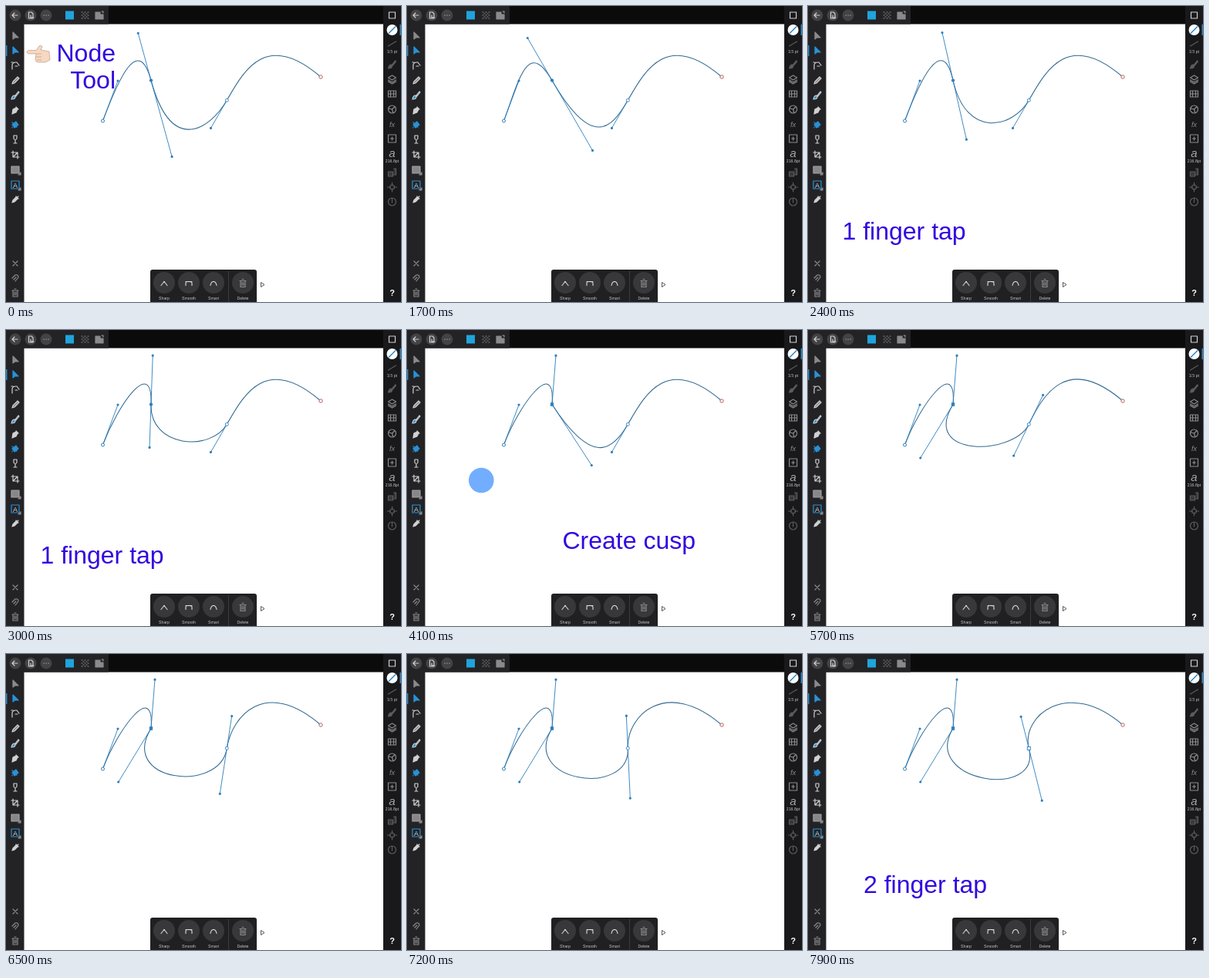
These frames come from a looping animation (512 by 384 pixels, 8000 ms). An HTML page:

```html
<!DOCTYPE html>
<html lang="en">
<head>
<meta charset="utf-8">
<style>
  html, body { margin: 0; height: 100%; overflow: hidden; background: #fff; }
  svg { display: block; width: 512px; height: 384px; }
  text { font-family: "Liberation Sans", Arial, sans-serif; }
  .caption { font-size: 32px; fill: #3208df; }
  .tiny { font-size: 5.2px; fill: #c4c4c6; text-anchor: middle; }
  .icon { fill: none; stroke-width: 1.2; stroke-linejoin: round; stroke-linecap: round; }
</style>
</head>
<body>
<svg viewBox="0 0 512 384">
  <rect width="512" height="384" fill="#fff"/>
  <g id="drawing" fill="none" stroke="#2b7ebd">
    <path id="curve" stroke="#326a91" stroke-width="1.05"/>
    <path id="arms" stroke-width=".9"/>
    <path id="dots" stroke-width="3.2" stroke-linecap="round"/>
    <circle cx="125.5" cy="149" r="2" fill="#fff"/>
    <circle cx="408" cy="92" r="2.2" fill="#fff" stroke="#b5625f"/>
    <rect id="nodeB" x="186.2" y="94.7" width="3.6" height="3.6" fill="#2b7ebd" stroke-width=".8"/>
    <rect id="nodeC" x="284.3" y="120.3" width="4" height="4" fill="#fff" stroke-width=".9"/>
  </g>
  <circle id="touch" r="16.3" fill="#72adff"/>

  <g id="intro">
    <g fill="#f6d8c3" stroke="#b98f78" stroke-width=".6" stroke-linejoin="round">
      <path d="M29 57.5H39L43 52q3-2 4 1l-2 4 11 2 1 11-6 3H42q-4 0-4-4l1-7H29q-4-2 0-4.500z"/>
      <path fill="none" d="M39 62h7M39 66h7M40 70h6"/>
    </g>
    <g class="caption" text-anchor="end"><text x="142" y="72">Node</text><text x="142" y="107">Tool</text></g>
  </g>
  <text class="caption" id="tapOne" x="44.500" y="303">1 finger tap</text>
  <text class="caption" id="cusp" x="201.500" y="284">Create cusp</text>
  <text class="caption" id="tapTwo" x="72" y="310">2 finger tap</text>

  <path fill="#0b0b0c" d="M0 0H512V23.500H0z"/>
  <path fill="#232326" d="M0 0H133V23.500H23.500V384H0z"/>
  <path fill="#19191b" d="M489 0H512V384H489z"/>
  <path fill="#2788c9" d="M0 51h1.500v14H0zM510.500 24h1.500v14h-1.500z"/>
  <g fill="#434346"><circle cx="12" cy="12" r="7.500"/><circle cx="32" cy="12" r="7.500"/><circle cx="52" cy="12" r="7.500"/></g>
  <rect x="77" y="6.500" width="11" height="11" fill="#20a4dc"/>

  <path fill="#202022" d="M187 384V345q0-3 3-3H322q3 0 3 3V384z"/>
  <path stroke="#3c3c3e" d="M288.500 344V384"/>
  <path d="M330.500 358.500v6l4.500-3z" fill="#fff" stroke="#444" stroke-width=".9"/>
  <g id="buttons"></g>
  <g id="icons"></g>

  <circle cx="500.500" cy="31" r="7" fill="#fff"/>
  <path d="M496 35.500l9-9" stroke="#2788c9" stroke-width="1.500"/>
  <g text-anchor="middle" fill="#d5d5d7">
    <text x="12" y="235.500" font-size="9">A</text>
    <text x="500.500" y="157" font-size="9" font-style="italic" fill="#8c8c8f">fx</text>
    <text x="500.500" y="196" font-size="15" font-style="italic" fill="#a5a5a8">a</text>
    <text x="500.500" y="376" font-size="11" font-weight="bold" fill="#fff">?</text>
  </g>
  <text class="tiny" x="500.500" y="61">3.5 pt</text>
  <text class="tiny" x="500.500" y="203">216.8pt</text>
</svg>
<script>
const $ = id => document.getElementById(id);
const LIGHT = '#d0d0d2', GREY = '#8a8a8d', DIM = '#5c5c5f', BLUE = '#2992d6';

function icon(x, y, d, color = LIGHT, fill = 'none') {
  $('icons').insertAdjacentHTML('beforeend',
    `<path class="icon" transform="translate(${x} ${y})" d="${d}" stroke="${color}" style="fill:${fill}"/>`);
}

const arrow = 'M-3-5V4L-.500 2L4 2z';
const pencil = 'M-4 4l1-3L3-5l2 2L-1 3z';
const brush = 'M4-5L0 0l1 1L5-4zM-1 0q-3 0-4 5q5 0 5-3z';
const dropper = 'M-4 4l1-3 4-4 2 2-4 4zM1-4l3 3M2-2l2-2';
const trash = 'M-4-3H4M-1-5H1M-3-3V5H3V-3M-1-1V3M1-1V3';
const ring = 'M-5 0a5 5 0 1 0 10 0a5 5 0 1 0-10 0';
const grid = 'M-4-4h1M0-4h1M4-4h1M-4 0h1M0 0h1M4 0h1M-4 4h1M0 4h1M4 4h1';

icon(12, 12, 'M3 0H-4M-1-3L-4 0L-1 3');
icon(32, 12, 'M-2.500-4H1L3-2V4H-2.500zM0 0V3H4');
icon(52, 12, 'M-3 0h.1M0 0h.1M3 0h.1');
icon(102, 12, grid + 'M-2-2h1M2-2h1M-2 2h1M2 2h1', GREY);
icon(121, 12, 'M-5-4H1V-1H5V5H-5zM3-5H5V-3', GREY, GREY);

icon(12, 39, arrow, GREY, GREY);
icon(12, 58, arrow, BLUE, BLUE);
icon(12, 77, 'M-4 5V0q0-4 5-4M-5-4h2M2-4l3 4M0 1h3', LIGHT);
icon(12, 97, pencil, LIGHT, GREY);
icon(12, 116, brush, LIGHT, BLUE);
icon(12, 135, 'M-4 5l1-6 4-2 2 2-2 4zM1-4l3 3M-4 5l3-3', LIGHT, LIGHT);
icon(12, 154, 'M-4 0L1-4L4 0L-1 4zM-4-3L2 3M-4 3v1', BLUE, BLUE);
icon(12, 173, 'M-2-5H2V-1Q0 2-2-1zM0 1V5M-2 5H2', LIGHT);
icon(12, 193, 'M-3-5V3H5M-5-3H3V5M-2 2L2-2');
icon(12, 212, 'M-5-4H5V5H-5z', '#a2a2a5', '#87878a');
icon(12, 232, 'M-5-5H5V5H-5z', BLUE);
icon(12, 251, dropper, LIGHT, LIGHT);
icon(18, 218, 'M1-2V1H-2z', GREY, GREY);
icon(18, 238, 'M1-2V1H-2z', GREY, GREY);
icon(12, 334, 'M-3-3L3 3M3-3L-3 3', GREY);
icon(12, 353, 'M-4 0L0-4q4-1 4 3L0 4M-2 2L1-1', GREY);
icon(12, 372, trash, GREY);

icon(500.5, 12, 'M-4-4H4V4H-4zM0-4H4V0M-4 0V4H0');
icon(500.5, 49, 'M-5 3L5-3', DIM);
icon(500.5, 76, brush, DIM, DIM);
icon(500.5, 95, 'M-5-2L0-5L5-2L0 1zM-5 1L0 4L5 1M-5 3L0 6L5 3', GREY);
icon(500.5, 114, 'M-5-4H5V4H-5zM-5 0H5M-2-4V4M2-4V4', GREY);
icon(500.5, 134, ring + 'M0 0L3-3M0 0L-4-1M0 0L1 4', GREY);
icon(500.5, 172, 'M-5-5H5V5H-5zM-2 0H2M0-2V2', GREY);
icon(500.5, 216, 'M-5-1H1V5H-5zM2-5H5V3H2', DIM, '#38383a');
icon(500.5, 235, 'M-3 0a3 3 0 1 0 6 0a3 3 0 1 0-6 0M0-6V-2M0 2V6M-6 0H-2M2 0H6', DIM);
icon(500.5, 254, ring + 'M0-5V1', DIM);

[['Sharp', 205, 'M-4 3L0-2L4 3'], ['Smooth', 237, 'M-4 3V0q0-2 4-2t4 2V3M-4-2H4'],
 ['Smart', 269, 'M-4 3Q-3-2 0-2T4 3'], ['Delete', 307, trash]].forEach(([label, x, d]) => {
  $('buttons').insertAdjacentHTML('beforeend',
    `<circle cx="${x}" cy="359" r="14" fill="#38383a"/><text class="tiny" x="${x}" y="381">${label}</text>`);
  icon(x, 359.5, d, label === 'Delete' ? GREY : LIGHT);
  if (label !== 'Delete') icon(x, 357.5, 'M0 0h.1', '#fff');
});

const A = [125.5, 149], A_OUT = [145, 97], B = [188, 96.5], C = [286.3, 122.3];
const D_IN = [336, 30], D = [408, 92];

// Keys are [time, value, value], interpolated linearly.
function track(t, keys) {
  const next = keys.findIndex(k => k[0] > t);
  if (next < 0) return keys[keys.length - 1].slice(1);
  if (next === 0) return keys[0].slice(1);
  const a = keys[next - 1], b = keys[next], f = (t - a[0]) / (b[0] - a[0]);
  return a.slice(1).map((v, i) => v + (b[i + 1] - v) * f);
}

const polar = ([x, y], angle, length) =>
  [x + length * Math.cos(angle * Math.PI / 180), y + length * Math.sin(angle * Math.PI / 180)];

// Angle and length of the handle below each node.
const swingB = [[0, 74.7, 102.6], [700, 67, 104], [900, 67, 104], [1200, 63, 105],
  [1400, 63, 105], [1700, 60, 105], [3000, 92, 56], [3300, 94.5, 56]];
const swingC = [[5500, 120, 41.7], [6500, 98.7, 59.7], [7900, 76, 70]];
const cuspB = [[3300, 184, 152], [4100, 239.3, 175.5], [5000, 146, 165], [5300, 145.7, 166]];
const touchPath = [[4100, 96.3, 195], [5000, 95, 199]];

const show = (id, on) => $(id).style.display = on ? '' : 'none';

function draw(t) {
  const [angleB, lengthB] = track(t, swingB), [angleC, lengthC] = track(t, swingC);
  const bIn = polar(B, angleB, -63.5);
  const bOut = t < 3300 ? polar(B, angleB, lengthB) : track(t, cuspB);
  const cIn = polar(C, angleC, lengthC), cOut = polar(C, angleC, -42.2);

  $('curve').setAttribute('d', `M${A}C${A_OUT} ${bIn} ${B}C${bOut} ${cIn} ${C}C${cOut} ${D_IN} ${D}`);
  const arms = [[A, A_OUT], [B, bIn], [B, bOut], [C, cIn]];
  if (t >= 5500) arms.push([C, cOut]);
  $('arms').setAttribute('d', arms.map(([node, tip]) => `M${node}L${tip}`).join(''));
  $('dots').setAttribute('d', arms.map(([, tip]) => `M${tip}h.01`).join(''));
  $('nodeB').setAttribute('rx', t < 3300 ? 2 : 0);
  $('nodeC').setAttribute('rx', t < 7800 ? 2 : 0);

  const [x, y] = track(t, touchPath);
  $('touch').setAttribute('cx', x);
  $('touch').setAttribute('cy', y);
  show('touch', t >= 3300 && t < 5300);
  show('intro', t < 1000);
  show('tapOne', t >= 2400 && t < 3300);
  show('cusp', t >= 3400 && t < 5300);
  show('tapTwo', t >= 7300);
}

const start = performance.now();
function tick() {
  const t = (performance.now() - start) % 8000;
  draw(Math.floor(t / 100) * 100);
  requestAnimationFrame(tick);
}
tick();
</script>
</body>
</html>
```
